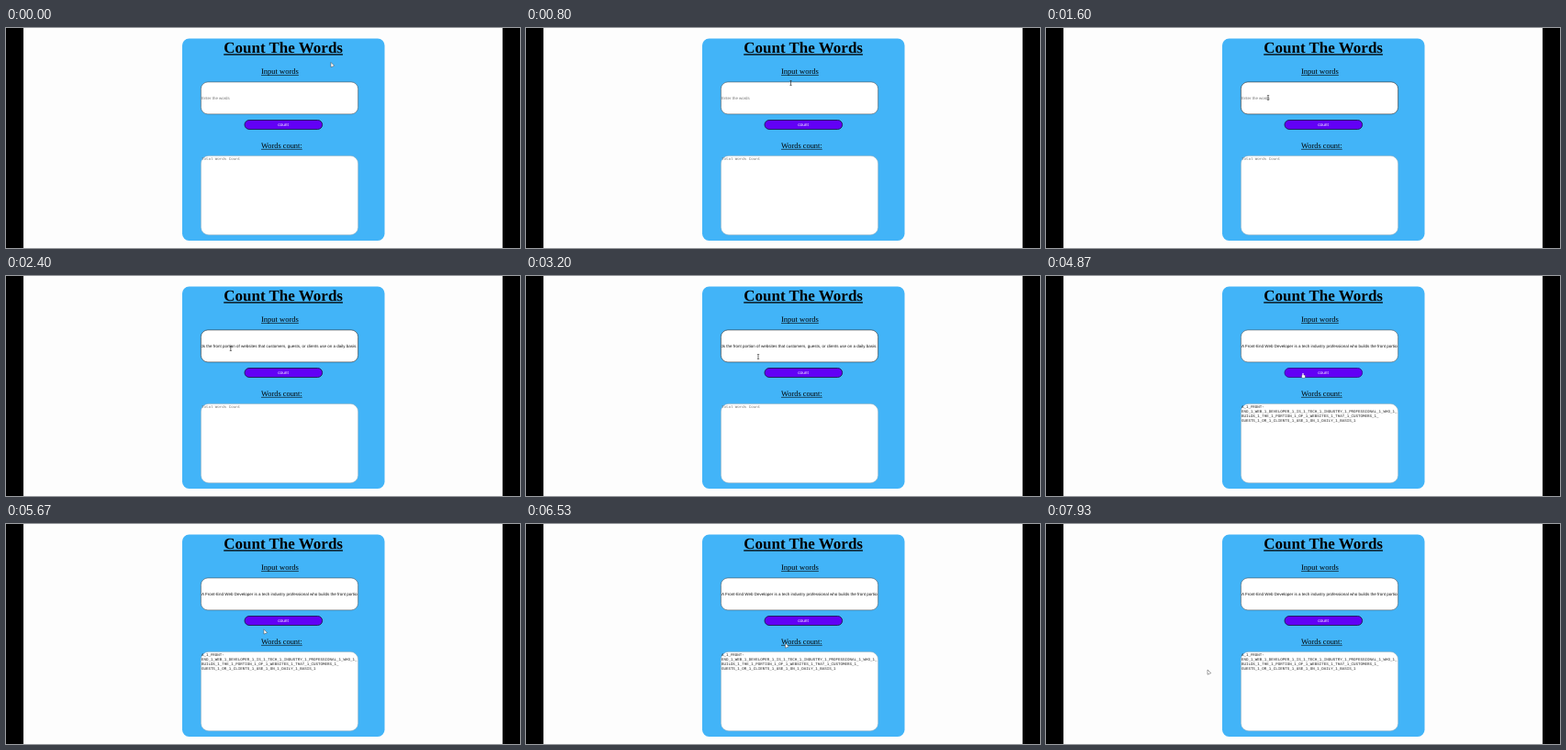
Recreate the animation shown at these times as an HTML page with a canvas. Size 560x240 px, loop 8000 ms.

```html
<!DOCTYPE html>
<html lang="en">
<head>
<meta charset="utf-8">
<title>Count The Words</title>
<style>
html, body { margin: 0; width: 100%; height: 100%; overflow: hidden; background: #fdfdfd; }
canvas { display: block; width: 560px; height: 240px; }
</style>
</head>
<body>
<canvas id="stage"></canvas>
<script>
const W = 560, H = 240, LOOP = 8000;
const FOCUS = 1200, PASTE = 2400, CLICK = 4500, MOVE = 900;
const SERIF = '"Liberation Serif", serif';
const SANS = '"Liberation Sans", sans-serif';
const MONO = '"Liberation Mono", monospace';
const canvas = document.getElementById('stage');
const ctx = canvas.getContext('2d');
const scale = window.devicePixelRatio || 1;
canvas.width = W * scale;
canvas.height = H * scale;

const rect = (x, y, w, h, r) => ({ x, y, w, h, r });
const card = rect(192, 11.5, 220.5, 220.5, 7.5);
const input = rect(212.4, 58.9, 171.2, 35, 7.5);
const button = rect(260, 100.5, 84.6, 10, 5);
const output = rect(212.4, 139.4, 171.2, 86.3, 8.5);

const sentence = 'A Front-End Web Developer is a tech industry professional who builds ' +
  'the front portion of websites that customers, guests, or clients use on a daily basis.';

// One entry per distinct word; the first hyphen breaks the line.
const tally = [...new Set(sentence.toUpperCase().match(/[A-Z]+/g))]
  .map(word => word + '_1').join('_').replace('FRONT_1_END', 'FRONT-END');
const result = wrap(tally, 68);

function wrap(str, width) {
  const dash = str.indexOf('-') + 1;
  const lines = [str.slice(0, dash), ''];
  for (const part of str.slice(dash).match(/[A-Z]+_1_?/g)) {
    if (lines.at(-1).length + part.length > width) lines.push('');
    lines[lines.length - 1] += part;
  }
  return lines;
}

// Where the pointer rests and when it gets there
const stops = [
  { at: 0, x: 354, y: 37.5 },
  { at: FOCUS, x: 242, y: 76 },
  { at: 3000, x: 253, y: 88 },
  { at: 4100, x: 280, y: 106 },
  { at: 6200, x: 282.5, y: 130 },
  { at: 7700, x: 176, y: 159 }
];

function pointerAt(t) {
  let { x, y } = stops[0];
  for (const stop of stops.slice(1)) {
    const u = Math.min(1, Math.max(0, (t - stop.at + MOVE) / MOVE));
    const k = u * u * (3 - 2 * u);
    x += (stop.x - x) * k;
    y += (stop.y - y) * k;
  }
  return { x, y };
}

const over = (p, b) => p.x > b.x && p.x < b.x + b.w && p.y > b.y && p.y < b.y + b.h;

function box(b, fill, stroke, line = 0.6) {
  ctx.beginPath();
  ctx.roundRect(b.x, b.y, b.w, b.h, b.r);
  ctx.fillStyle = fill;
  ctx.fill();
  if (!stroke) return;
  ctx.strokeStyle = stroke;
  ctx.lineWidth = line;
  ctx.stroke();
}

function label(str, x, y, font, color, align = 'left') {
  ctx.font = font;
  ctx.fillStyle = color;
  ctx.textAlign = align;
  ctx.fillText(str, x, y);
}

function heading(str, x, y, font, gap, thick) {
  label(str, x, y, font, '#000');
  ctx.fillRect(x, y + gap, ctx.measureText(str).width, thick);
}

function inputText(t) {
  const left = input.x + 0.6, right = input.x + input.w - 1, base = 77.9;
  ctx.save();
  ctx.beginPath();
  ctx.rect(left - 0.3, input.y, right - left + 0.6, input.h);
  ctx.clip();
  if (t < PASTE) label('Enter the words', left, base, '4.4px ' + SANS, '#777');
  else if (t < CLICK) label(sentence, right, base, '4.5px ' + SANS, '#111', 'right');
  else label(sentence, left, base, '4.5px ' + SANS, '#111');
  ctx.restore();
}

function pointer(p) {
  ctx.save();
  ctx.translate(p.x, p.y);
  if (over(p, button)) {
    box(rect(-1.5, 2, 4, 3.2, 1), '#fff', '#222', 0.4);
    box(rect(-0.6, 0, 1.2, 3.6, 0.6), '#fff');
  } else if (over(p, input)) {
    ctx.fillStyle = '#333';
    ctx.fillRect(-0.35, -2.8, 0.7, 5.6);
    for (const y of [-2.9, 2.4]) ctx.fillRect(-1.2, y, 2.4, 0.5);
  } else {
    ctx.beginPath();
    ctx.lineTo(0, 0);
    ctx.lineTo(0, 5.2);
    ctx.lineTo(3.7, 3.7);
    ctx.closePath();
    ctx.fillStyle = '#fff';
    ctx.fill();
    ctx.strokeStyle = '#444';
    ctx.lineWidth = 0.5;
    ctx.stroke();
  }
  ctx.restore();
}

function draw(t) {
  const p = pointerAt(t);
  const focused = t >= FOCUS && t < CLICK;
  ctx.setTransform(scale, 0, 0, scale, 0, 0);
  ctx.textRendering = 'geometricPrecision';
  ctx.fillStyle = '#000';
  ctx.fillRect(0, 0, W, H);
  ctx.fillStyle = '#fdfdfd';
  ctx.fillRect(19, 0, 522, H);

  box(card, '#42b4f8');
  heading('Count The Words', 237.2, 27, 'bold 17px ' + SERIF, 1.3, 1.3);
  heading('Input words', 278, 50.3, '8.5px ' + SERIF, 0.9, 0.6);
  heading('Words count:', 278, 131, '8.4px ' + SERIF, 0.9, 0.6);

  box(input, '#fff', focused ? '#2a2a2a' : '#4a545c');
  inputText(t);

  box(button, '#6200f5', over(p, button) ? '#2b0a80' : '#17103c', 0.8);
  label('count', 302, 107, '4.8px ' + SANS, '#fff', 'center');

  box(output, '#fff', '#8fa6b4', 0.5);
  const mono = '4.16px ' + MONO, left = output.x + 0.5;
  if (t < CLICK) label('Total Words Count', left, 144.2, mono, '#777');
  else result.forEach((line, i) => label(line, left, 144.3 + i * 4.95, mono, '#222'));

  pointer(p);
}

const start = performance.now();
function tick() {
  draw((performance.now() - start) % LOOP);
  requestAnimationFrame(tick);
}
tick();
</script>
</body>
</html>
```
